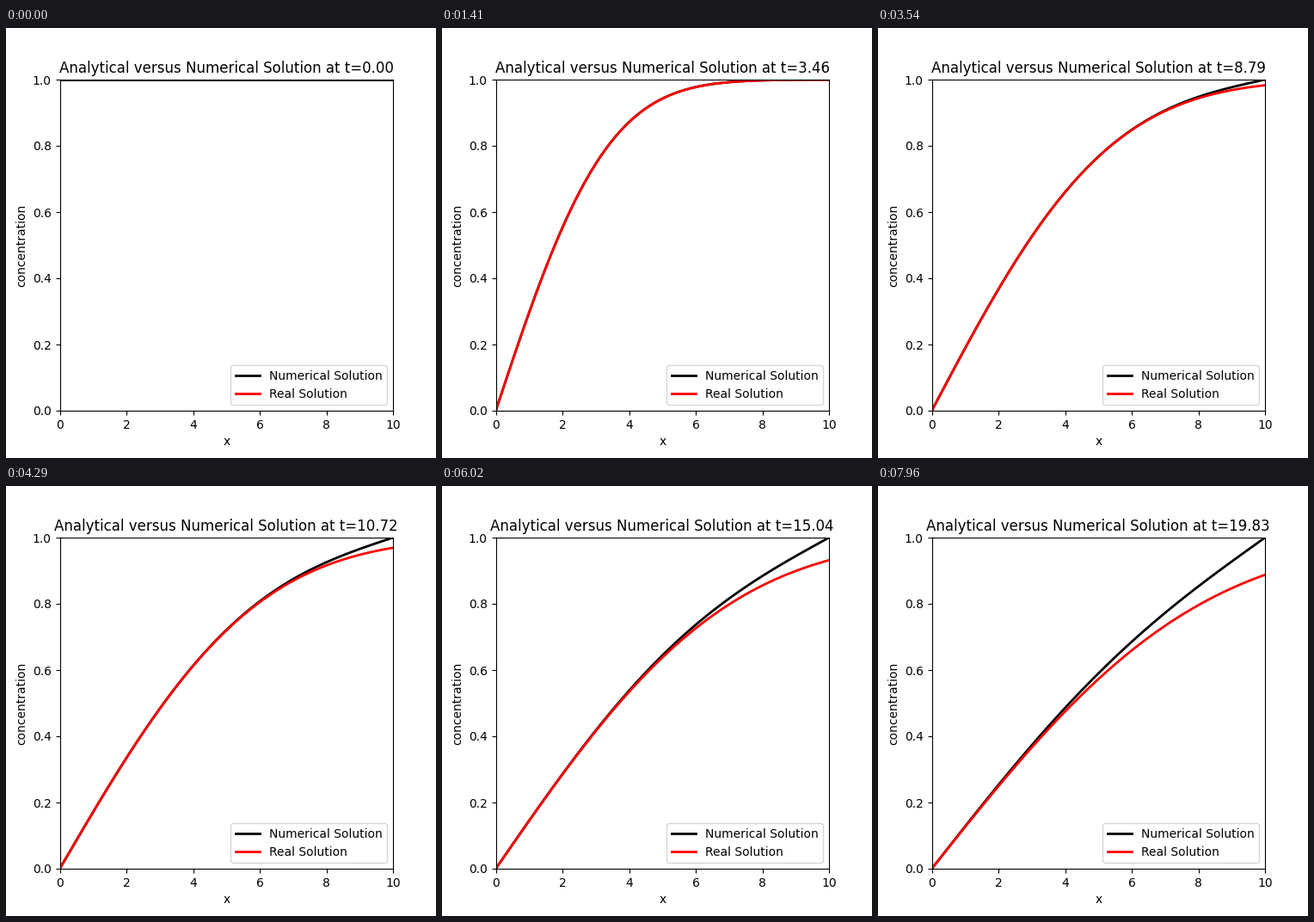
These frames come from a looping animation (500 by 500 pixels, 7.99 s). A matplotlib script:

```python
import math

import matplotlib.pyplot as plt
import numpy as np
from matplotlib.animation import FuncAnimation

LENGTH = 10
FRAMES = 300
LOOP_MS = 7990
STEP = 20 / 300.5  # simulated time per frame
MODES = np.arange(1, 201)

x = np.linspace(0, LENGTH, 201)
waves = np.sin(np.outer(x, MODES) * np.pi / LENGTH) * 2 / (np.pi * MODES)
erf = np.vectorize(math.erf)


def bounded(t):
    """Diffusion with both ends held: 0 on the left, 1 on the right."""
    if t == 0:
        return np.ones_like(x)
    return x / LENGTH + waves @ np.exp(-(MODES * np.pi / LENGTH) ** 2 * t)


def half_space(t):
    """Diffusion into a domain without a right end."""
    if t == 0:
        return np.full_like(x, np.nan)
    return erf(x / (2 * math.sqrt(t)))


plt.rcParams["font.family"] = "DejaVu Sans"
fig, ax = plt.subplots(figsize=(5, 5), dpi=100)
ax.set(xlim=(0, LENGTH), ylim=(0, 1), xlabel="x", ylabel="concentration")
numerical, = ax.plot([], [], color="black", lw=2, label="Numerical Solution")
real, = ax.plot([], [], color="red", lw=2, label="Real Solution")
title = ax.set_title("")
ax.legend(loc="lower right")


def update(frame):
    t = frame * STEP
    numerical.set_data(x, bounded(t))
    real.set_data(x, half_space(t))
    title.set_text(f"Analytical versus Numerical Solution at t={t:.2f}")
    return numerical, real, title


anim = FuncAnimation(fig, update, frames=FRAMES, interval=LOOP_MS / FRAMES,
                     init_func=lambda: update(0), repeat=True, repeat_delay=0)
plt.show()
```
